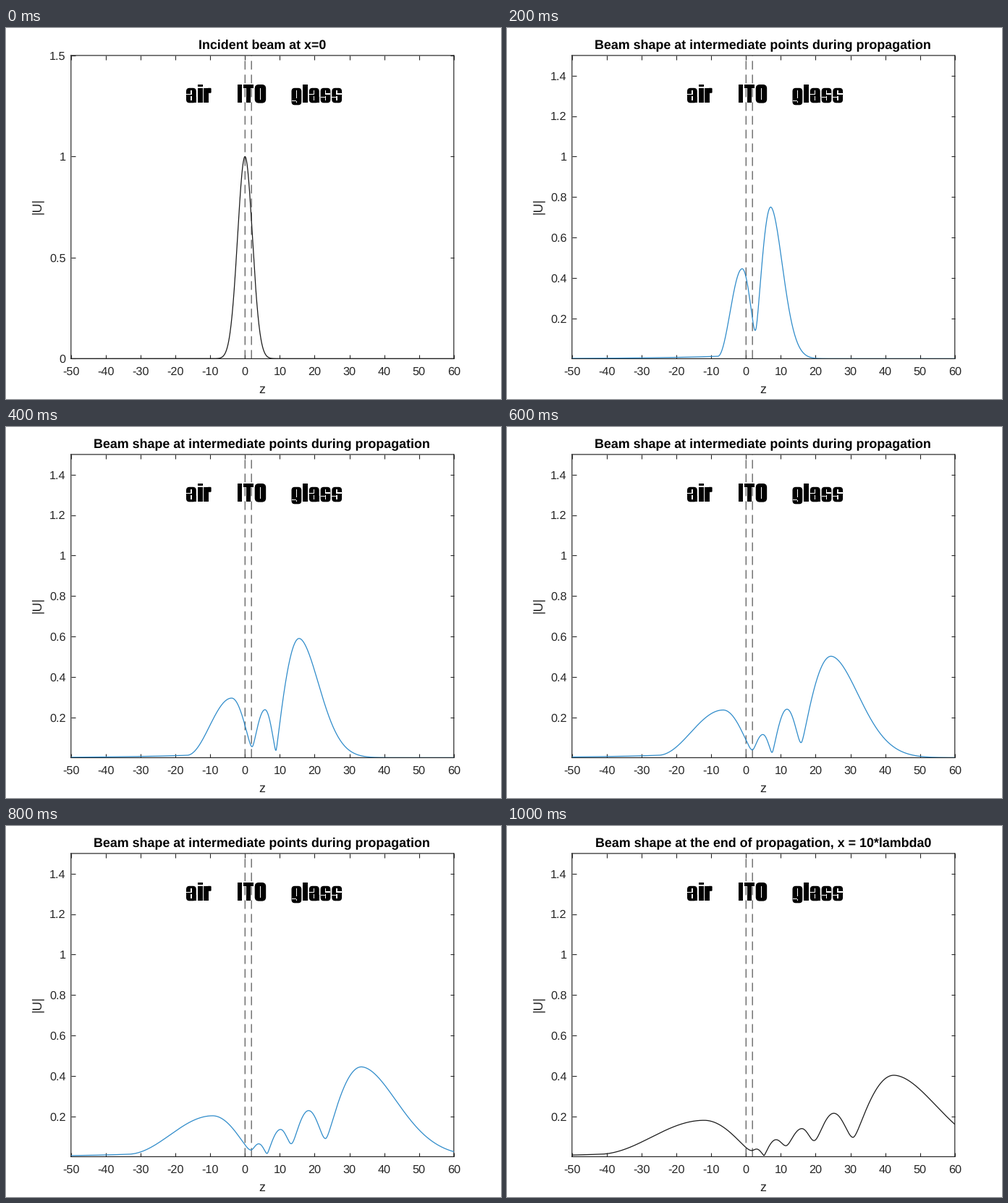
Recreate the animation shown at these times as a matplotlib script. Size 684 by 512 pixels, loop 1.2 s.

```python
import numpy as np
import matplotlib.pyplot as plt
from matplotlib.animation import FuncAnimation
from matplotlib.patches import FancyBboxPatch

W, H, DPI = 684, 512, 64
PX = 72 / DPI  # points per pixel
LEFT, RIGHT, TOP, BOTTOM = 89.8, 618.8, 37.9, 456.4
INK, BLUE, BLACK = "#262626", "#2e8bca", "#1a1a1a"
Z = np.linspace(-50, 60, 1101)

plt.rcParams.update({
    "font.family": "Liberation Sans",
    "axes.unicode_minus": False,
    "text.hinting": "none",
})


def ease(u):
    return 0.5 - 0.5 * np.cos(np.pi * np.clip(u, 0, 1))


def extrema(n):
    """Crests and troughs (z, |U|) after n steps, from left to right."""
    reflected = -1.1 - 2.73 * (n - 1), 0.445 * np.sqrt(0.783 / (n - 0.217))
    front = 9.1 * n - 3.3 + 1.3 / n, 0.75 * np.sqrt(1.623 / (n + 0.623))

    def crest(k):
        if k == 1:
            return front
        age = n - k
        z = 7.54 - 0.9 * k + (7.15 - 0.67 * k) * age + 0.23 * age ** 2
        share = (0.26 + 0.7 / k) * ((age + 1) / n) ** (0.4 + 0.1 * k)
        return z, front[1] * share

    keys = [reflected, (1.4 + 1.25 / n, 0.026 + 0.114 / n ** 2), crest(n)]
    for k in range(n - 1, 0, -1):
        ahead, behind = crest(k), keys[-1]
        z = behind[0] + (0.32 if k == 1 else 0.38) * (ahead[0] - behind[0])
        keys += [(z, 0.11 - 0.01 * k - 0.064 * 0.4 ** (n - k - 1)), ahead]
    return np.array(keys).T


def beam(n):
    """Fringes eased in intensity, between a soft left edge and a right tail."""
    z, u = extrema(n)
    i = np.clip(np.searchsorted(z, Z) - 1, 0, len(z) - 2)
    t = np.clip((Z - z[i]) / (z[i + 1] - z[i]), 0, 1)
    t = np.where(i == len(z) - 2, t ** (0.85 + 0.2 / n), t)
    fringes = np.sqrt(u[i] ** 2 + (u[i + 1] ** 2 - u[i] ** 2) * ease(t))

    start = 0.5 - 8.6 * n
    floor = 0.012 * np.exp(-np.maximum(start - Z, 0) / 20)
    edge = floor + (u[0] - floor) * ease((Z - start) / (z[0] - start))
    reach = np.maximum(Z - z[-1], 0) / (1.1 + 2.3 * n)
    tail = u[-1] * np.exp(-0.5 * reach ** 1.85)
    return np.where(Z < z[0], edge, np.where(Z > z[-1], tail, fringes))


fig = plt.figure(figsize=(W / DPI, H / DPI), dpi=DPI, facecolor="white")

plot = fig.add_axes([LEFT / W, 1 - BOTTOM / H, (RIGHT - LEFT) / W, (BOTTOM - TOP) / H])
plot.set(xlim=(-50, 60), ylim=(0, 1.5))
plot.set_xticks(range(-50, 61, 10))
plot.tick_params(direction="in", top=True, right=True, length=5.5 * PX,
                 width=1.1 * PX, color=INK, labelcolor=INK, labelsize=16.3 * PX)
plot.tick_params(axis="x", pad=10.7 * PX)
plot.tick_params(axis="y", pad=7.3 * PX)
for spine in plot.spines.values():
    spine.set(color=INK, linewidth=1.2 * PX, snap=False)

for z in (0, 1.85):
    plot.plot([z, z], [0, 1.5], color="#404040", lw=1.1 * PX, snap=False,
              dashes=(12 / 1.1, 7 / 1.1), dash_capstyle="butt")
curve, = plot.plot([], [], lw=1.25 * PX, zorder=3)

# Overlay in pixel coordinates, y pointing down.
stage = fig.add_axes([0, 0, 1, 1], facecolor="none")
stage.set(xlim=(0, W), ylim=(H, 0))
stage.axis("off")

title = stage.text(353.8, 28.4, "", size=17.9 * PX, weight="bold", ha="center")
stage.text(354, 503.5, "z", size=17.9 * PX, ha="center", color=INK)
stage.text(43.2, 246.2, "|U|", size=17.9 * PX, rotation=90,
           ha="center", va="center", color=INK)

# Heavy condensed lettering, built from bars and rounded blocks.
BASE, CAP, XH, STEM, GAP = 103.3, 25, 20.5, 6.8, 1.9


def block(x, low, high, w=STEM, r=0, color="black"):
    style = f"round,pad=0,rounding_size={r}" if r else "square,pad=0"
    stage.add_patch(FancyBboxPatch((x, BASE - high), w, high - low,
                                   boxstyle=style, fc=color, lw=0))


def cut(x, low, high, w=1.4):
    block(x, low, high, w, color="white")


def letter(char, x):
    """Draw one letter and return its width."""
    if char in "Iil":
        block(x, 0, CAP)
        if char == "i":
            cut(x, XH, XH + 1.6, STEM)
        return STEM
    if char == "T":
        block(x, CAP - 4.6, CAP, 2 * STEM)
        block(x + STEM / 2, 0, CAP)
        return 2 * STEM
    if char == "r":
        block(x, 0, XH)
        block(x + 5, 13.5, XH, 5.2, r=1.2)
        return 10.2
    if char == "O":
        block(x, -0.3, CAP + 0.3, 15.5, r=5.5)
        cut(x + 7, 4.5, CAP - 4.5)
        return 15.5

    width, side = 13.8, 6.2
    drop = 3 if char == "g" else 0
    block(x, -drop, XH, width, r=4.5)
    cut(x + side, 3.5 - drop, 9.3 - 2.4 * drop)
    cut(x + side, 11.8 - 1.7 * drop, XH - 3.5)
    if char == "s":
        cut(x + side, 11.8, 13, width - side)
        cut(x, 7.6, 8.8, side)
    else:
        cut(x, 11.3 - 3.1 * drop, 12.5 - 3.1 * drop, side)
        block(x + width - 6.2, 0, 8, 6.2)
    return width


for word, x in (("air", 249), ("ITO", 319.5), ("glass", 394.5)):
    for char in word:
        x += letter(char, x) + GAP

LAST = 5


def update(step):
    if step == 0:
        heading, profile = "Incident beam at x=0", np.exp(-(Z / 3) ** 2)
        ticks = np.arange(4) * 0.5
    else:
        heading = "Beam shape at intermediate points during propagation"
        profile, ticks = beam(step), np.arange(1, 8) * 0.2
    if step == LAST:
        heading = "Beam shape at the end of propagation, x = 10*lambda0"
    title.set_text(heading)
    curve.set_data(Z, profile)
    curve.set_color(BLACK if step in (0, LAST) else BLUE)
    plot.set_yticks(ticks, [f"{t:g}" for t in ticks])
    return curve, title


anim = FuncAnimation(fig, update, frames=LAST + 1, interval=200,
                     init_func=lambda: update(0), repeat=True, repeat_delay=0)
plt.show()
```
